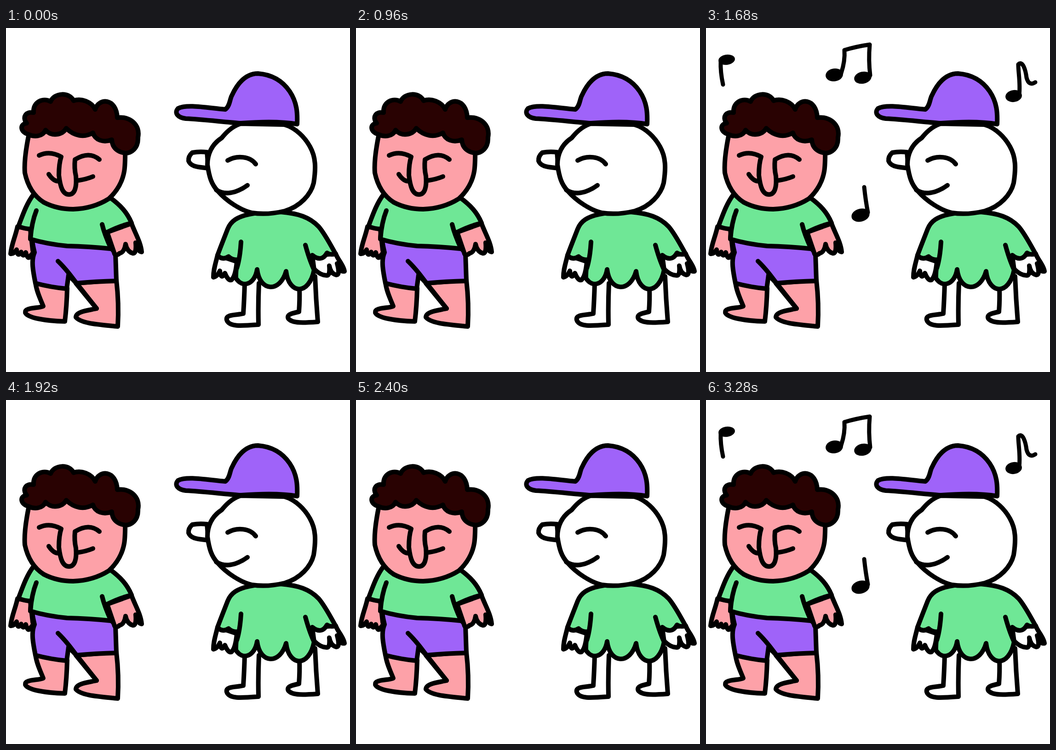
An HTML page for the animation above (3360 ms loop, 748x748 px).

```html
<!DOCTYPE html>
<html lang="en">
<head>
<meta charset="utf-8">
<title>Two friends humming</title>
<style>
  html, body { margin: 0; width: 100%; height: 100%; overflow: hidden; background: #fff; }
  svg { display: block; width: 100vw; height: 100vh; }
  path { stroke: #000; stroke-width: 10; stroke-linecap: round; stroke-linejoin: round; fill: none; }
  #notes path { stroke-width: 9; }
  .skin { fill: #fda1a8; }
  .green { fill: #6fe796; }
  .purple { fill: #9f63f9; }
  .white { fill: #fff; }
  .hair { fill: #290202; }
</style>
</head>
<body>
<svg viewBox="0 0 748 748">
  <g id="curly">
    <!-- legs and shorts -->
    <path class="skin" d="M64 553C66 572 75 590 81 605C70 610 40 607 42 619C46 630 85 637 128 638Q132 605 133 566Z"/>
    <path class="skin" d="M152 555L197 610C180 614 152 616 152 629C163 643 205 645 243 649Q246 600 240 548Z"/>
    <path class="purple" d="M57 461C58 472 60 480 62 488C54 505 59 530 64 555Q98 564 132 567L136 537L153 555Q195 551 240 550L238 490L229 479Z"/>
    <path d="M113 507C135 528 145 545 159 562L197 610"/>
    <!-- arms -->
    <path class="skin" d="M25 432C20 455 12 470 10 491Q17 492 23 482Q25 500 33 487Q37 501 43 488Q48 507 54 494Q61 489 58 483L53 437Z"/>
    <path class="skin" d="M273 425C280 445 293 465 295 487Q286 486 282 467Q284 490 276 490Q263 486 260 470Q257 488 247 490Q237 498 235 488L220 444Z"/>
    <!-- shirt -->
    <path class="green" d="M59 363C44 383 36 408 27 431Q40 437 54 437L53 459Q90 470 133 474Q180 475 228 480L220 444Q245 431 273 424C263 400 248 385 228 370Z"/>
    <path d="M66 397Q56 422 53 458M209 427Q214 448 228 479"/>
    <!-- head -->
    <path class="skin" d="M54 212C44 255 39 290 41 315C47 343 60 365 82 379C105 391 125 394 146 394C180 393 205 383 224 371C243 353 253 335 257 312Q260 295 259 240L220 200Z"/>
    <path d="M72 277Q95 266 120 280C116 292 115 305 115 320C118 345 123 362 137 362C150 362 154 345 152 322Q148 305 150 286Q181 267 203 286M93 318Q103 333 113 333M154 332Q175 329 189 323"/>
    <path class="hair" d="M48 231C31 226 29 209 45 207C34 193 44 181 60 184C58 160 81 151 97 160C105 140 138 139 147 158C163 152 186 160 194 177C202 151 240 152 242 195C268 191 293 210 287 238C288 262 272 272 260 272C242 270 231 260 230 243C212 250 194 244 189 228C170 239 148 235 131 218C122 234 98 236 86 222C80 236 62 238 48 231Z"/>
  </g>
  <g id="capped">
    <!-- legs -->
    <path class="white" d="M519 555Q518 590 516 621C500 625 477 622 480 635C485 650 510 648 549 645Q548 600 550 555"/>
    <path class="white" d="M638 565Q639 590 637 617C623 620 609 623 614 632C623 643 650 641 678 639Q674 590 672 540"/>
    <!-- arms -->
    <path class="white" d="M460 494C455 515 451 525 451 542Q459 541 465 528Q467 549 476 533Q483 550 490 548Q499 540 502 508Z"/>
    <path class="white" d="M717 491C722 505 734 515 736 529Q726 531 720 512Q727 538 718 537Q706 534 703 517Q705 539 697 538Q684 538 670 524L663 495Z"/>
    <!-- tunic -->
    <path class="green" d="M540 403C500 409 488 422 482 437C475 455 467 475 460 494Q470 506 484 497Q491 504 503 504C502 520 499 528 500 544C515 567 541 557 546 525C552 575 596 575 609 529C615 580 659 582 670 526L666 494C682 507 692 500 698 489Q708 495 716 490C706 472 693 447 680 432C660 411 635 403 597 400Z"/>
    <path d="M511 465Q509 500 502 522M651 472Q660 505 670 526"/>
    <!-- head -->
    <path class="white" d="M437 270Q420 268 405 271Q396 279 397 289C402 302 417 302 440 305Z"/>
    <path class="white" d="M510 208C490 215 478 228 469 239C447 253 438 275 438 297C442 325 447 340 460 354C480 377 510 396 535 402C560 406 585 403 606 398C640 388 663 362 669 337C674 305 674 281 661 258C650 238 630 217 605 210Z"/>
    <path d="M482 288C502 276 531 279 543 296M457 352C475 364 500 360 525 342"/>
    <!-- cap -->
    <path class="purple" d="M374 175C394 164 445 175 477 177C487 170 487 153 491 147C502 123 520 99 548 99C575 101 600 113 617 138C633 162 634 185 633 209C600 203 550 204 510 207C470 204 430 199 391 197C374 195 365 185 374 175Z"/>
  </g>
  <g id="notes">
    <ellipse cx="45" cy="69" rx="18" ry="11" transform="rotate(-8 45 69)"/>
    <path d="M32 73Q31 95 37 123"/>
    <ellipse cx="279" cy="102" rx="19" ry="14" transform="rotate(-8 279 102)"/>
    <ellipse cx="341" cy="108" rx="19" ry="13" transform="rotate(-12 341 108)"/>
    <path d="M294 98C300 80 302 62 301 48Q328 40 356 36Q353 70 357 103"/>
    <ellipse cx="669" cy="148" rx="18" ry="13" transform="rotate(-8 669 148)"/>
    <path d="M681 145C684 122 679 97 679 79C689 70 695 92 697 108Q702 127 716 118"/>
    <ellipse cx="336" cy="407" rx="20" ry="14" transform="rotate(-15 336 407)"/>
    <path d="M344 346Q347 375 352 401"/>
  </g>
</svg>
<script>
  const LOOP = 3360, STEP = 80;
  const notes = document.getElementById("notes");
  const start = performance.now();

  // The notes blink on every second step.
  function draw() {
    const step = Math.floor((performance.now() - start) % LOOP / STEP);
    notes.style.visibility = step % 2 ? "visible" : "hidden";
    requestAnimationFrame(draw);
  }
  draw();
</script>
</body>
</html>
```
